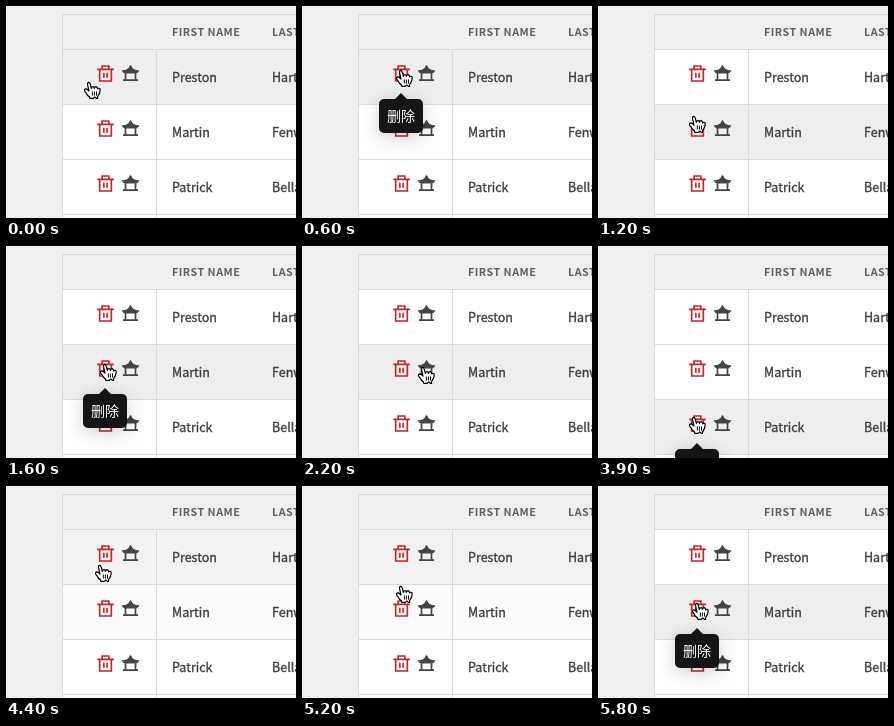
Recreate the animation shown at these times as an HTML page with a canvas. Size 290x212 px, loop 6100 ms.

```html
<!DOCTYPE html>
<html lang="en">
<head>
<meta charset="utf-8">
<title>Table row actions</title>
<style>
html, body { margin: 0; width: 100%; height: 100%; overflow: hidden; background: #efefef; }
canvas { display: block; width: 290px; height: 212px; }
</style>
</head>
<body>
<canvas id="stage" width="290" height="212"></canvas>
<script>
const ctx = document.getElementById('stage').getContext('2d');
const LOOP = 6100, STEP = 100, ROW = 55, TOP = 43;
const FONT = '"Noto Sans CJK SC", "Noto Sans CJK JP", "Noto Sans CJK", "Noto Sans", sans-serif';
const people = [['Preston', 'Hartley'], ['Martin', 'Fenwick'], ['Patrick', 'Bellamy']];

// Pointer moves: start, end, x and y of the fingertip
const home = { x: 82, y: 77 };
const moves = [
  [0, 600, 98, 65],
  [700, 1200, 95, 111],
  [1300, 1600, 98, 119],
  [1800, 2200, 120, 122],
  [2400, 2800, 98, 122],
  [3100, 3800, 95, 172],
  [4000, 4400, 93, 80],
  [4400, 4700, 98, 66],
  [4900, 5600, 98, 118]
];

const easeOut = k => 1 - (1 - k) ** 2;

function pointerAt(t) {
  let { x, y } = home;
  for (const [from, to, nx, ny] of moves) {
    if (t <= from) break;
    const k = easeOut(Math.min(1, (t - from) / (to - from)));
    x += (nx - x) * k;
    y += (ny - y) * k;
  }
  return { x, y };
}

const rowOf = p => Math.floor((p.y - TOP) / ROW);
const onTrash = p => Math.abs(p.x - 99) < 10 && Math.abs((p.y - TOP) % ROW - 25) < 9.5;

// Linear fade: share of the last few moments in which the test held
function fade(test, t, length) {
  const n = 20;
  let hits = 0;
  for (let i = 0; i < n; i++) if (test(pointerAt(t - length * i / n))) hits++;
  return hits / n;
}

function rect(x, y, w, h, color) {
  ctx.fillStyle = color;
  ctx.fillRect(x, y, w, h);
}

function text(str, x, y, font, color, spacing = 0, weight = 0) {
  ctx.font = font + ' ' + FONT;
  ctx.letterSpacing = spacing + 'px';
  ctx.fillStyle = ctx.strokeStyle = color;
  ctx.fillText(str, x, y);
  if (weight) {
    ctx.lineWidth = weight;
    ctx.strokeText(str, x, y);
  }
}

function at(x, y, scale, paint) {
  ctx.save();
  ctx.translate(x, y);
  ctx.scale(scale, scale);
  paint();
  ctx.restore();
}

// Icons on a 24 unit grid
const bin = new Path2D('M2 7H22M8 7V3H16V7M5 7V21H19V7M10 11V17M14 11V17');
const pavilion = new Path2D('M11.5 2H12.5A9 9 0 0 0 22.5 7.9A4.5 4.5 0 0 1 19 11.9V19H21V21H3V19H5V11.9A4.5 4.5 0 0 1 1.5 7.9A9 9 0 0 0 11.5 2ZM17 12H7V19H17Z');
const hand = new Path2D('M3.3 12.4L2.1 10.4L.6 8.5Q0 6.6 1.9 6.4Q3.3 6.8 4.6 8.5L3.3 2.5Q3 .5 4.4.3Q5.6.4 6.3 3.8L6.8 6Q6.9 4.2 8.4 4.2Q9.6 4.4 9.6 6Q10 4.3 11.3 4.3Q12.5 4.6 12.7 6.4Q13.4 5.4 14.6 6Q15.2 6.8 14.8 8.7Q14.6 11 12.9 12.8Q12.3 13.6 12.6 15.1H11.4L10.4 14H9.7L8.6 15.1H5.4Q5.5 13.6 3.3 12.4Z');
const creases = new Path2D('M7.7 8.8V12.6M9.6 8.8V12.6M11.6 8.8V12.6');

function icons() {
  at(89.5, 57.5, 5 / 6, () => {
    ctx.strokeStyle = '#c1272d';
    ctx.lineWidth = 2;
    ctx.stroke(bin);
  });
  at(114.5, 57.5, 5 / 6, () => {
    ctx.fillStyle = '#444';
    ctx.fill(pavilion, 'evenodd');
  });
}

function tooltip(alpha) {
  ctx.globalAlpha = alpha;
  ctx.save();
  ctx.shadowColor = 'rgba(0,0,0,.2)';
  ctx.shadowBlur = 18;
  ctx.shadowOffsetY = 4;
  ctx.fillStyle = '#151515';
  ctx.beginPath();
  ctx.roundRect(77, 93, 44, 34, 5);
  ctx.moveTo(99, 87);
  ctx.lineTo(106, 94);
  ctx.lineTo(92, 94);
  ctx.fill();
  ctx.restore();
  text('删除', 85, 115, '14px', '#fff');
}

function pointer() {
  ctx.lineJoin = 'round';
  ctx.fillStyle = '#fff';
  ctx.fill(hand);
  ctx.strokeStyle = '#000';
  ctx.lineWidth = 1.1;
  ctx.stroke(hand);
  ctx.lineWidth = .9;
  ctx.stroke(creases);
}

function draw(t) {
  const line = '#dadada', tip = pointerAt(t);
  rect(0, 0, 290, 212, '#efefef');
  text('FIRST NAME', 166, 30, 'bold 10.75px', '#606060', .5);
  text('LAST NAME', 266, 30, 'bold 10.75px', '#606060', .5);

  for (let i = 0; i < 4; i++) {
    const y = TOP + i * ROW;
    const shade = Math.round(255 - 17 * fade(p => rowOf(p) === i, t, 250));
    rect(57, y, 233, ROW, `rgb(${shade},${shade},${shade})`);
    rect(57, y, 233, 1, line);
  }
  rect(56, 8, 234, 1, line);
  rect(56, 8, 1, 204, line);
  rect(150, TOP, 1, 169, line);

  people.forEach((names, i) => at(0, i * ROW, 1, () => {
    names.forEach((name, col) => text(name, 166 + col * 100, 76, '12.5px', '#3c3c3c', 0, .3));
    icons();
  }));
  people.forEach((_, i) => at(0, i * ROW, 1, () =>
    tooltip(fade(p => rowOf(p) === i && onTrash(p), t, 200))));
  at(Math.round(tip.x) - 4, Math.round(tip.y) - 1, 1.08, pointer);
}

const start = performance.now();
function tick() {
  const t = (performance.now() - start) % LOOP;
  draw(Math.floor(t / STEP) * STEP);
  requestAnimationFrame(tick);
}
tick();
</script>
</body>
</html>
```
